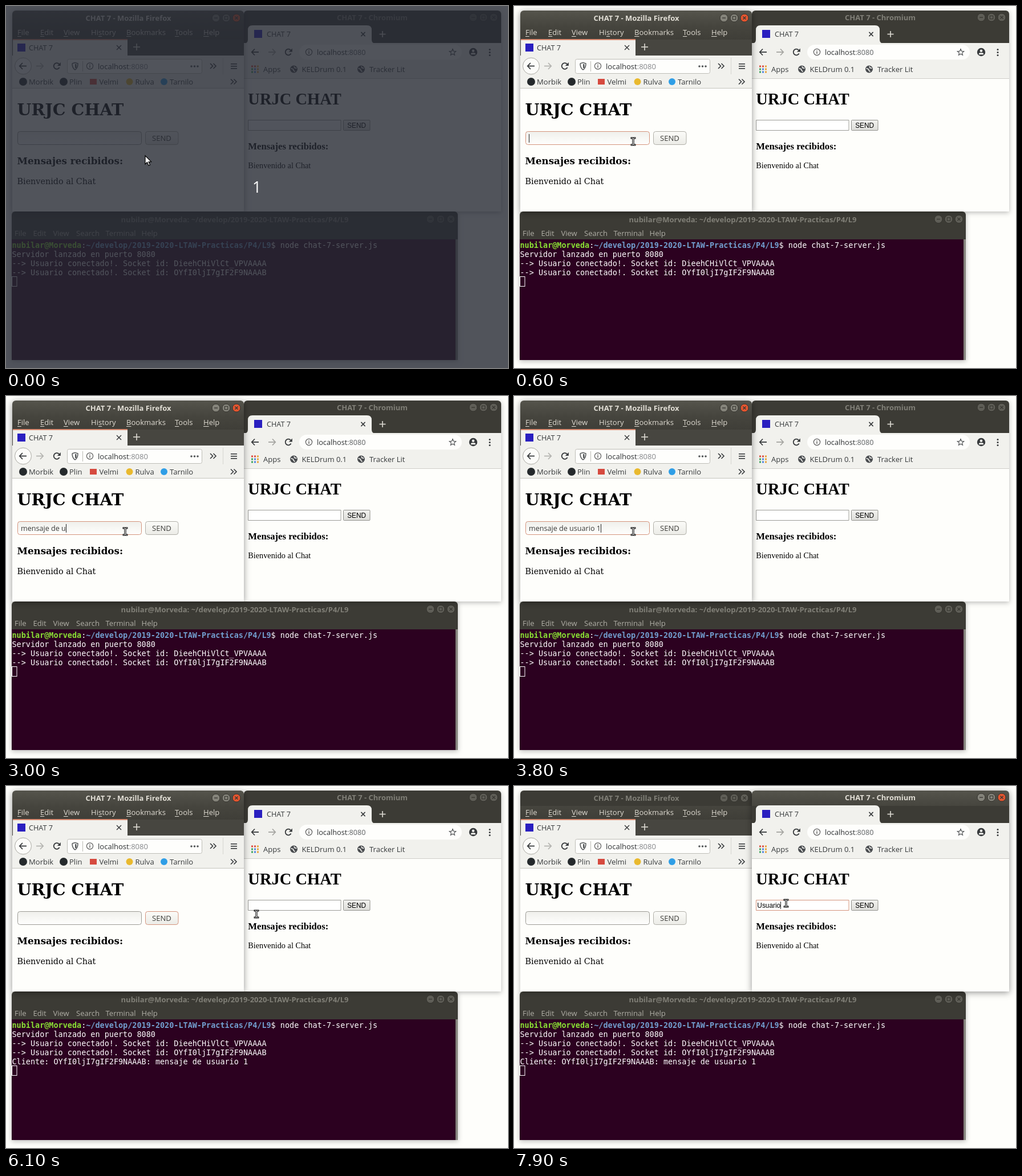
An HTML page with a canvas for the animation above (8000 ms loop, 880 by 636 pixels).

```html
<!DOCTYPE html>
<html lang="es">
<head>
<meta charset="utf-8">
<title>Chat demo</title>
<style>
html, body { margin: 0; width: 100%; height: 100%; overflow: hidden; background: #fefefb; }
canvas { display: block; }
</style>
</head>
<body>
<canvas id="stage" width="880" height="636"></canvas>
<script>
const ctx = document.getElementById('stage').getContext('2d');
const LOOP = 8000, TAU = Math.PI * 2;
const PAPER = '#fefefb', BAR = '#f1f1ed', DARK = '#3c3b35', INK = '#36393b', ACCENT = '#d4937c';
const UI = '13.05px "Open Sans", sans-serif';
const UI_SMALL = '12.7px "Open Sans", sans-serif';
const UI_BOLD = 'bold 13px "Open Sans", sans-serif';
const MONO = '13.48px "DejaVu Sans Mono", monospace';

// ---------- timeline ----------
const CURSOR = [
  [0, 244, 263, 'arrow'], [100, 221, 249, 'arrow'], [200, 214, 246, 'arrow'],
  [300, 210, 240, 'beam'], [400, 209, 238, 'beam'], [4600, 226, 238, 'beam'],
  [4700, 267, 239, 'arrow'], [4900, 264, 237, 'arrow'], [5000, 263, 236, 'arrow'],
  [5900, 302, 234, 'arrow'], [6000, 392, 227, 'arrow'], [6100, 439, 225, 'beam'],
  [6300, 460, 213, 'beam'], [6400, 477, 206, 'beam']
];
const TYPED = [[0, 0], [1600, 1], [1900, 3], [2100, 4], [2300, 6], [2400, 7], [2600, 9], [2700, 10],
  [3000, 12], [3200, 13], [3300, 15], [3500, 17], [3600, 18], [3700, 19], [3800, 20], [5200, 0]];
const REPLY = [[0, 0], [7200, 1], [7400, 2], [7500, 3], [7600, 4], [7700, 5], [7800, 6], [7900, 7]];
const at = (steps, t) => steps.filter(s => s[0] <= t).pop();
const within = (t, a, b) => t >= a && t < b;

// ---------- helpers ----------
function fill(color, x, y, w, h) {
  ctx.fillStyle = color;
  ctx.fillRect(x, y, w, h);
}
function text(s, x, y, color, font = UI, align = 'left') {
  ctx.font = font;
  ctx.fillStyle = color;
  ctx.textAlign = align;
  ctx.fillText(s, x, y);
  return ctx.measureText(s).width;
}
function line(color, width, ...pts) {
  ctx.strokeStyle = color;
  ctx.lineWidth = width;
  ctx.beginPath();
  for (let i = 0; i < pts.length; i += 2) ctx.lineTo(pts[i], pts[i + 1]);
  ctx.stroke();
}
function box(x, y, w, h, r, paint, edge) {
  ctx.beginPath();
  ctx.roundRect(x, y, w, h, r);
  if (paint) { ctx.fillStyle = paint; ctx.fill(); }
  if (edge) { ctx.strokeStyle = edge; ctx.lineWidth = 1; ctx.stroke(); }
}
function disc(x, y, r, paint, edge, width = 1) {
  ctx.beginPath();
  ctx.arc(x, y, r, 0, TAU);
  if (paint) { ctx.fillStyle = paint; ctx.fill(); }
  if (edge) { ctx.strokeStyle = edge; ctx.lineWidth = width; ctx.stroke(); }
}
function grad(y0, y1, a, b) {
  const g = ctx.createLinearGradient(0, y0, 0, y1);
  g.addColorStop(0, a);
  g.addColorStop(1, b);
  return g;
}

// ---------- icons ----------
function cross(x, y, r, color, width = 1.5) {
  line(color, width, x - r, y - r, x + r, y + r);
  line(color, width, x - r, y + r, x + r, y - r);
}
function plus(x, y, r, color) {
  line(color, 1.7, x - r, y, x + r, y);
  line(color, 1.7, x, y - r, x, y + r);
}
function arrowIcon(x, y, dir, color) {
  line(color, 1.8, x - 6, y, x + 6, y);
  line(color, 1.8, x + dir, y - 5.5, x + dir * 6.2, y, x + dir, y + 5.5);
}
function reload(x, y) {
  ctx.strokeStyle = INK;
  ctx.lineWidth = 1.8;
  ctx.beginPath();
  ctx.arc(x, y, 5.3, 0.5, 5.5);
  ctx.stroke();
  ctx.fillStyle = INK;
  ctx.beginPath();
  ctx.moveTo(x + 6.8, y - 6.5);
  ctx.lineTo(x + 6.8, y - 0.5);
  ctx.lineTo(x + 0.8, y - 0.5);
  ctx.fill();
}
function info(x, y) {
  disc(x, y, 5.6, null, '#5b5b5b', 1.2);
  fill('#5b5b5b', x - 0.7, y - 1, 1.4, 4);
  fill('#5b5b5b', x - 0.7, y - 3.2, 1.4, 1.4);
}
function chevrons(x, y) {
  for (const d of [-5, 0.5]) line(INK, 1.6, x + d, y - 4.5, x + d + 4.5, y, x + d, y + 4.5);
}
function globe(x, y) {
  disc(x, y, 6.5, '#4a4d50');
  line(BAR, 1.6, x - 5, y - 1.5, x - 1, y, x - 0.5, y + 2, x + 2, y + 4.5);
  line(BAR, 1.6, x + 0.5, y - 5, x + 1.5, y - 2.5, x + 5, y - 1.5);
}
function star(x, y) {
  ctx.beginPath();
  for (let i = 0; i < 10; i++) {
    const a = -Math.PI / 2 + i * Math.PI / 5, r = i % 2 ? 2.7 : 6;
    ctx.lineTo(x + r * Math.cos(a), y + r * Math.sin(a));
  }
  ctx.closePath();
  ctx.strokeStyle = '#55585a';
  ctx.lineWidth = 1.2;
  ctx.stroke();
}
function shield(x, y) {
  ctx.beginPath();
  ctx.moveTo(x - 5, y - 4.5);
  ctx.lineTo(x, y - 6);
  ctx.lineTo(x + 5, y - 4.5);
  ctx.quadraticCurveTo(x + 5, y + 3.5, x, y + 6.5);
  ctx.quadraticCurveTo(x - 5, y + 3.5, x - 5, y - 4.5);
  ctx.strokeStyle = '#55585a';
  ctx.lineWidth = 1.5;
  ctx.stroke();
  fill('#55585a', x, y - 3.5, 2.5, 7);
}

// ---------- window parts ----------
function frame(x, y, w, h, active) {
  ctx.save();
  ctx.shadowColor = active ? 'rgba(0,0,0,.42)' : 'rgba(0,0,0,.27)';
  ctx.shadowBlur = active ? 12 : 9;
  ctx.shadowOffsetY = 2;
  box(x, y, w, h, [6, 6, 0, 0], PAPER);
  ctx.restore();
}
function titleBar(x, y, w, h, label, cx, base, btns, active) {
  box(x, y, w, h, [6, 6, 0, 0], active ? grad(y, y + h, '#55544c', '#46453e') : DARK);
  text(label, cx, base, active ? '#e2dfd6' : '#807f77', UI_BOLD, 'center');
  const mark = active ? '#3a3934' : '#393832', face = active ? '#84837a' : '#5f5e57';
  btns.forEach((bx, i) => {
    const by = base - 5;
    disc(bx, by, 7, active && i === 2 ? '#e4552f' : face, '#34332e');
    if (i === 0) line(mark, 1.4, bx - 3, by, bx + 3, by);
    if (i === 1) { ctx.strokeStyle = mark; ctx.lineWidth = 1.2; ctx.strokeRect(bx - 2.7, by - 2.7, 5.4, 5.4); }
    if (i === 2) cross(bx, by, 2.6, mark, 1.4);
  });
}
function caret(x, y, h) { fill('#222', Math.round(x), y, 1, h); }

function firefox(t, active) {
  frame(11, 8, 406, 353, active);
  titleBar(11, 8, 406, 27, 'CHAT 7 - Mozilla Firefox', 214.5, 26, [368, 386, 404], active);
  fill(grad(35, 59, '#46453e', '#3f3e38'), 11, 35, 406, 24);
  [['File', 20, 0], ['Edit', 60, 0], ['View', 101, 0], ['History', 149, 2], ['Bookmarks', 211, 0],
    ['Tools', 296, 0], ['Help', 346, 0]].forEach(([s, x, u]) => {
    text(s, x, 51, '#dfdbd2');
    const a = x + ctx.measureText(s.slice(0, u)).width;
    fill('#dfdbd2', a, 53, ctx.measureText(s[u]).width, 1);
  });
  fill('#474640', 11, 59, 406, 28);

  fill(BAR, 12, 59, 201, 29);
  fill('#dc8a70', 12, 58, 201, 2);
  fill('#2a1fc0', 20, 66, 14, 14);
  text('CHAT 7', 40, 77.5, INK, UI_SMALL);
  cross(198, 73, 4, INK);
  plus(229, 72, 6, '#d6d4cc');

  fill(BAR, 11, 87, 406, 58);
  disc(30, 105.5, 14.5, '#fcfcf9', '#aaa9a3');
  arrowIcon(30, 105.5, -1, INK);
  arrowIcon(59, 105.5, 1, '#b4b4b0');
  reload(89, 105.5);
  box(107.5, 93.5, 236, 25, 3, '#fefefc', '#bebdb7');
  shield(121, 105.5);
  fill('#bbbab5', 134, 97, 1, 18);
  info(147, 105.5);
  const w = text('localhost', 161, 110.5, '#2c2f31');
  text(':8080', 161 + w, 110.5, '#85878a');
  for (const x of [325, 330.5, 336]) disc(x, 106, 1.8, '#55585a');
  chevrons(363, 105.5);
  fill('#d6d5d0', 380, 91, 1, 29);
  for (const y of [101, 105, 109]) fill(INK, 394, y, 11, 1.6);

  disc(30, 133, 7, '#24292c');
  disc(101, 133, 7, '#24292c');
  fill('#d64a3f', 147, 128, 12, 10);
  disc(216.5, 133, 6, '#e9b92e');
  disc(277, 133, 6, '#2f9ee6');
  [['Morbik', 40], ['Plin', 111], ['Velmi', 163.5], ['Rulva', 226.5], ['Tarnilo', 287]]
    .forEach(([s, x]) => text(s, x, 138, INK));
  chevrons(399, 133);

  fill(PAPER, 11, 145, 406, 216);
  fill('#c6c5bf', 11, 144, 406, 1);
  text('URJC CHAT', 19.5, 191.5, '#000', 'bold 28.65px "DejaVu Serif", serif');
  text('Mensajes recibidos:', 19.5, 278, '#000', 'bold 16.7px "DejaVu Serif", serif');
  text('Bienvenido al Chat', 19.5, 313, '#000', '14.35px "DejaVu Serif", serif');

  const focus = within(t, 600, 5100);
  box(20.5, 220.5, 217, 23, 4, grad(221, 243, '#f0f0ec', '#fefefc'), focus ? ACCENT : '#9c9b95');
  const s = 'mensaje de usuario 1'.slice(0, at(TYPED, t)[1]);
  const sw = text(s, 26, 237, '#3a3a38', '12.6px "Open Sans", sans-serif');
  if (within(t, 600, 4300)) caret(26 + sw, 225, 15);

  const over = within(t, 4700, 5900), down = within(t, 5100, 5200);
  const face = down ? ['#d8d7d2', '#e5e4df'] : over ? ['#fffffd', '#f8f8f5'] : ['#fbfbf8', '#ecece7'];
  box(244.5, 220.5, 57.5, 23, 4, grad(221, 243, ...face), within(t, 5100, 6300) ? ACCENT : '#b0afa8');
  text('SEND', 273, 237, '#3c3c39', UI, 'center');
}

function chromium(t, active) {
  frame(417, 8, 451, 353, active);
  titleBar(417, 8, 451, 27, 'CHAT 7 - Chromium', 642, 25, [819, 837, 855], active);
  fill(DARK, 417, 35, 451, 30);
  fill(BAR, 417, 65, 451, 62);
  ctx.fillStyle = BAR;
  ctx.beginPath();
  ctx.moveTo(418, 66);
  ctx.quadraticCurveTo(424, 65, 424, 59);
  ctx.lineTo(424, 42);
  ctx.quadraticCurveTo(424, 34, 432, 34);
  ctx.lineTo(633, 34);
  ctx.quadraticCurveTo(641, 34, 641, 42);
  ctx.lineTo(641, 59);
  ctx.quadraticCurveTo(641, 65, 647, 66);
  ctx.fill();
  fill('#2a1fc0', 435, 42, 14, 14);
  text('CHAT 7', 457, 54, INK, UI_SMALL);
  cross(626, 49.5, 3.6, INK);
  plus(660, 49.5, 5.5, '#d6d4cc');

  arrowIcon(437, 81, -1, INK);
  arrowIcon(466, 81, 1, '#a5a5a1');
  reload(495, 81);
  box(514, 68, 285, 26, 13, '#fefefc');
  info(531, 81);
  const w = text('localhost', 545, 85.5, '#2c2f31', UI_SMALL);
  text(':8080', 545 + w, 85.5, '#5f6264', UI_SMALL);
  star(783, 81.5);
  disc(819, 81, 7.2, INK);
  disc(819, 78.8, 2.3, BAR);
  box(814.8, 82.3, 8.4, 3, [3, 3, 1, 1], BAR);
  for (const y of [76.5, 81.5, 86.5]) disc(848, y, 1.5, INK);

  const hues = ['#dc4b3e', '#dc4b3e', '#e8a33a', '#3fa65a', '#4a82e0', '#e8a33a', '#3fa65a', '#4a82e0', '#e8a33a'];
  hues.forEach((c, i) => fill(c, 430 + i % 3 * 5, 104.5 + Math.floor(i / 3) * 5, 3, 3));
  text('Apps', 451, 115.5, INK);
  globe(504.5, 111);
  text('KELDrum 0.1', 518.5, 115.5, INK);
  globe(622.5, 111);
  text('Tracker Lit', 637, 115.5, INK);

  fill(PAPER, 417, 127, 451, 234);
  fill('#cfcec9', 417, 127, 451, 1);
  const serif = '"Liberation Serif", serif', sans = '11.88px "Liberation Sans", sans-serif';
  text('URJC CHAT', 424.3, 173, '#000', 'bold 28.5px ' + serif);
  text('Mensajes recibidos:', 424.3, 251.5, '#000', 'bold 16.68px ' + serif);
  text('Bienvenido al Chat', 424.3, 285, '#000', '14.26px ' + serif);
  box(424.5, 200.5, 162.5, 18, 0, '#fff', active ? ACCENT : '#9b9b97');
  box(591.5, 200.5, 46.5, 18, 1, grad(200, 218, '#f3f3f0', '#dededa'), '#90908c');
  text('SEND', 614.7, 214, '#000', sans, 'center');
  const sw = text('Usuario'.slice(0, at(REPLY, t)[1]), 426.3, 214, '#000', sans);
  if (active && !within(t, 6900, 7200)) caret(426 + sw, 203, 13);
}

function terminal(t) {
  frame(10, 361, 782, 261, false);
  const path = '~/develop/2019-2020-LTAW-Practicas/P4/L9';
  fill(DARK, 10, 385, 782, 25);
  titleBar(10, 361, 782, 28, 'nubilar@Morveda: ' + path, 401, 379.5, [744, 762, 780], false);
  [['File', 15], ['Edit', 47.5], ['View', 82.5], ['Search', 123], ['Terminal', 174.5], ['Help', 237.5]]
    .forEach(([s, x]) => text(s, x, 404, '#b0aea6'));
  fill('#2c0120', 10, 410, 778, 212);
  fill('#85847d', 788, 410, 4, 212);
  let x = 10.5;
  const put = (s, color, bold) => { x += text(s, x, 424.5, color, (bold ? 'bold ' : '') + MONO); };
  put('nubilar@Morveda', '#8ae234', true);
  put(':', '#fff');
  put(path, '#729fcf', true);
  put('$ node chat-7-server.js', '#fff');
  const rows = ['Servidor lanzado en puerto 8080',
    '--> Usuario conectado!. Socket id: DieehCHiVlCt_VPVAAAA',
    '--> Usuario conectado!. Socket id: OYfI0ljI7gIF2F9NAAAB'];
  if (t >= 5500) rows.push('Cliente: OYfI0ljI7gIF2F9NAAAB: mensaje de usuario 1');
  rows.forEach((s, i) => text(s, 10.5, 440.6 + i * 16.1, '#fff', MONO));
  ctx.strokeStyle = '#fff';
  ctx.lineWidth = 1;
  ctx.strokeRect(10.5, Math.round(427 + rows.length * 16.1) + 0.5, 8.5, 17);
}

function pointer(x, y, kind) {
  ctx.save();
  ctx.translate(x, y);
  if (kind === 'beam') {
    const mark = (c, w) => {
      for (const d of [-1, 1]) line(c, w, 3 * d, -6, d, -6, 0, -5, 0, 5, d, 6, 3 * d, 6);
    };
    ctx.lineCap = 'square';
    mark('#000', 2.8);
    mark('#fff', 0.8);
  } else {
    const p = [0, 0, 0, 14.8, 3.5, 11.6, 6, 17.2, 8.4, 16.1, 6, 10.8, 10.6, 10.6];
    ctx.beginPath();
    for (let i = 0; i < p.length; i += 2) ctx.lineTo(p[i], p[i + 1]);
    ctx.closePath();
    ctx.fillStyle = '#fff';
    ctx.fill();
    ctx.strokeStyle = '#000';
    ctx.lineWidth = 1.2;
    ctx.stroke();
  }
  ctx.restore();
}

function draw(t) {
  fill(PAPER, 0, 0, 880, 636);
  terminal(t);
  if (t >= 6300) {
    firefox(t, false);
    chromium(t, true);
  } else {
    chromium(t, false);
    firefox(t, true);
  }
  if (t < 100) {
    fill('rgba(38,42,52,.8)', 0, 0, 880, 636);
    text('1', 432, 328, '#fff', '27px "Open Sans", sans-serif');
  }
  const [, x, y, kind] = at(CURSOR, t);
  pointer(x, y, kind);
}

const start = performance.now();
function tick() {
  draw((performance.now() - start) % LOOP);
  requestAnimationFrame(tick);
}
tick();
</script>
</body>
</html>
```
